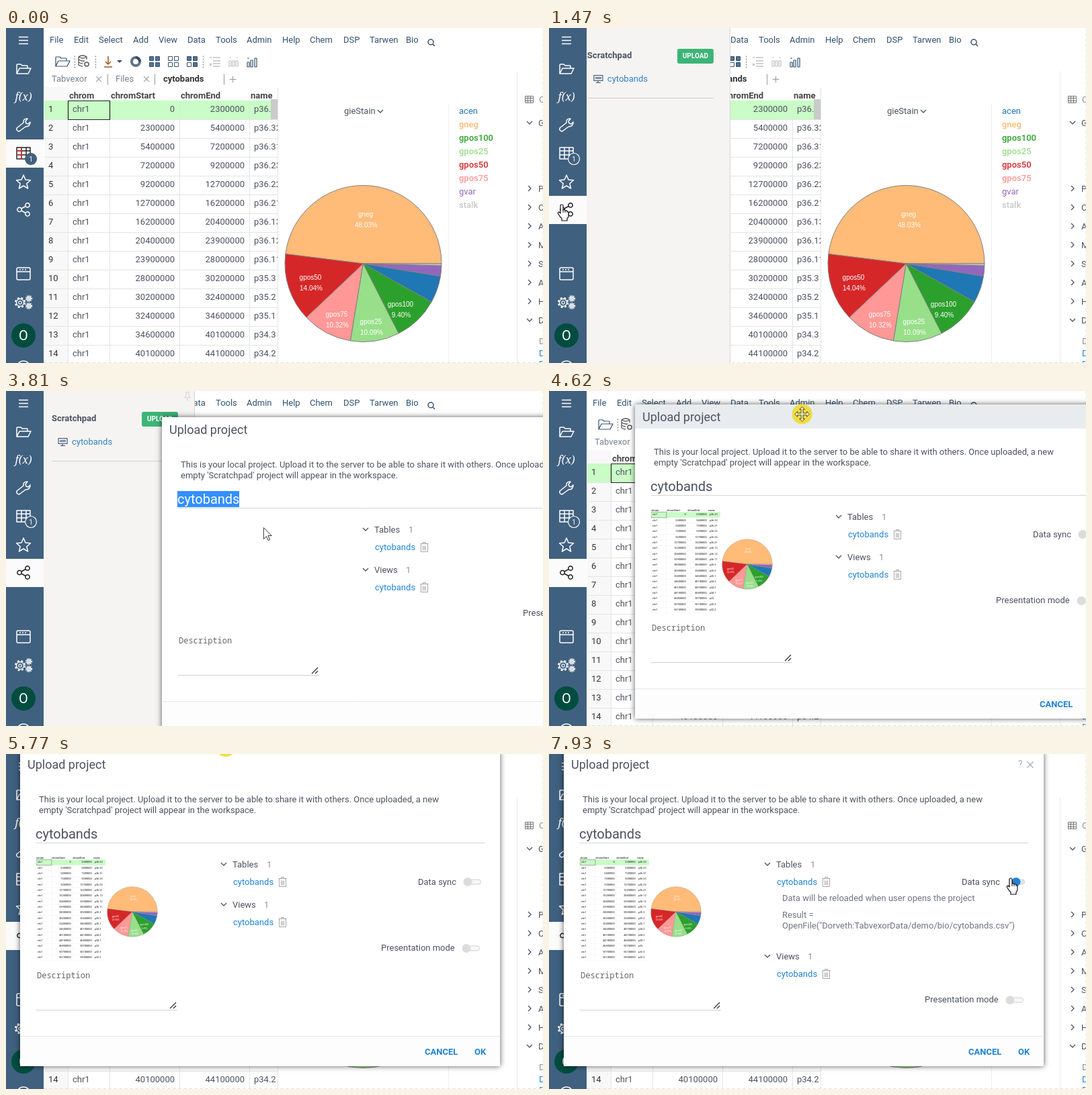
An HTML page with a canvas for the animation above (8000 ms loop, 799 px wide and 499 px high).

```html
<!DOCTYPE html>
<html lang="en">
<head>
<meta charset="utf-8">
<title>Upload project</title>
<style>
html, body { margin: 0; width: 100%; height: 100%; overflow: hidden; background: #fff; }
canvas { display: block; }
</style>
</head>
<body>
<canvas id="stage" width="799" height="499"></canvas>
<script>
const g = document.getElementById('stage').getContext('2d');
const LOOP = 8000;
const INK = '#4d5261', NAVY = '#34506c', SIDE = '#40607f', LINK = '#2083d5', PALE = '#e2e4e6', MUTED = '#8a919c';
const SANS = 'Roboto, sans-serif';

const clamp = v => Math.max(0, Math.min(1, v));
const progress = (t, from, to) => clamp((t - from) / (to - from));
const easeOut = p => 1 - (1 - p) ** 2;

// y is the middle of the capitals; baselines sit on whole pixels
function text(str, x, y, color = INK, { size = 13, weight = 400, align = 'left', family = SANS } = {}) {
  g.font = `${weight} ${size}px ${family}`;
  g.textAlign = align;
  g.fillStyle = color;
  g.fillText(str, x, Math.round(y + size * 0.32));
}
function box(x, y, w, h, color) {
  g.fillStyle = color;
  g.fillRect(x, y, w, h);
}
function line(x1, y1, x2, y2, color = PALE, dash = []) {
  path(`M${x1 + .5} ${y1 + .5}L${x2 + .5} ${y2 + .5}`, 0, 0, color, { width: 1, dash });
}
function path(d, x, y, color, { fill, width = 1.5, dash = [] } = {}) {
  const shape = new Path2D(d);
  g.save();
  g.translate(x, y);
  g.lineJoin = 'round';
  if (fill) { g.fillStyle = fill; g.fill(shape); }
  if (color) {
    g.strokeStyle = color;
    g.lineWidth = width;
    g.setLineDash(dash);
    g.stroke(shape);
  }
  g.restore();
}
function circle(x, y, r, fill, color, options = {}) {
  path(`M${r} 0A${r} ${r} 0 1 1 ${-r} 0A${r} ${r} 0 1 1 ${r} 0`, x, y, color, { fill, ...options });
}
function clipped(x, y, w, h, draw) {
  g.save();
  g.beginPath();
  g.rect(x, y, w, h);
  g.clip();
  draw();
  g.restore();
}
function chevron(x, y, down, color = INK) {
  path(down ? 'M-4-2L0 2 4-2' : 'M-2-4L2 0-2 4', x, y, color, { width: 1.3 });
}
const cross = (x, y, r, color) => path(`M${-r} ${-r}L${r} ${r}M${r} ${-r}L${-r} ${r}`, x, y, color, { width: 1.2 });

const FOLDER = 'M-10 7V-6q0-1 1-1h5l2 2h7q1 0 1 1v3M-10 7l4-8H11l-4 8z';
const TABLE = 'M-10-9H10V8H-10zM-10-4H10M-10 2H10M-3-9V8M4-9V8';
const TRASH = 'M-6-5H6M-2-5v-2h4v2M-5-5V7H5V-5M-2-2V5M0-2V5M2-2V5';
const WRENCH = 'M-7 9q-4-1-3-5L0-4q-1-6 6-6L3-6 4-3 7-2 10-5q0 7-7 7L-5 8z';
const STAR = 'M0-10l3 7 7.5.7-5.7 5L6.6 10 0 6l-6.6 4 1.8-7.3-5.7-5L-3-3z';
const HAND = 'M4 13V2q0-2 2-2t2 2v6q3-1 3 1 3-1 3 1 2 0 2 2v5q0 2-2 4v3H6v-3Q3 18 .5 13.500 0 11 2 11z';
const ARROW = 'M0 0V17l4-4 3 6 2.500-1-3-6h5.500z';
const MOVE = 'M0-11L4-7H1.500V-1.500H7V-4L11 0 7 4V1.500H1.500V7H4L0 11-4 7h2.500V1.500H-7V4L-11 0-7-4v2.500h5.500V-7H-4z';

const ends = [2.3, 5.4, 7.2, 9.2, 12.7, 16.2, 20.4, 23.9, 28, 30.2, 32.4, 34.6, 40.1, 44.1, 46.8, 50.7, 56.1, 59];
const bands = 'p36.33 p36.32 p36.31 p36.23 p36.22 p36.21 p36.13 p36.12 p36.11 p35.3 p35.2 p35.1 p34.3 p34.2 p34.1 p33 p32.3 p32.2'.split(' ');
const slices = [
  ['gneg', 48.03, '#ffbb78', 535, 277], ['gpos50', 14.04, '#d62728', 453, 371],
  ['gpos75', 10.32, '#ff9896', 492, 426], ['gpos25', 10.09, '#98df8a', 543, 437],
  ['gpos100', 9.40, '#2ca02c', 587, 411], ['acen', 5.54, '#1f77b4'],
  ['gvar', 2.17, '#9467bd'], ['stalk', .41, '#c7c7c7']
];

function grid({ chromX, right, rows, numbered, ink }) {
  const cols = [chromX, 155, 259, 363], bottom = 108 + rows * 28;
  const left = numbered ? 57 : chromX;
  const toRight = { align: 'right' };
  clipped(left - 1, 88, right - left + 1, bottom - 88, () => {
    if (numbered) box(57, 88, 36, 411, '#f8f8f8');
    box(left, 108, right, 28, '#c9fcc6');
    ['chrom', 'chromStart', 'chromEnd', 'name'].forEach((h, i) => text(h, cols[i] + 1, 101, '#444', { weight: 700 }));
    for (let i = 0; i < rows; i++) {
      const y = 121 + 28 * i;
      if (numbered) text(i + 1, 63, y, '#333');
      text('chr1', chromX + 6, y, ink);
      text(i ? Math.round(ends[i - 1] * 1e6) : 0, 251, y, ink, toRight);
      text(Math.round(ends[i] * 1e6), 355, y, ink, toRight);
      text(bands[i], 369, y, ink);
      line(left, 136 + 28 * i, right, 136 + 28 * i);
    }
    cols.forEach(x => line(x - 1, 108, x - 1, bottom));
    path(`M${chromX - .5} 108.500H154.500V136.500H${chromX - .5}z`, 0, 0, '#222', { width: 1.2 });
  });
}

function pie(cx, cy, scale) {
  g.save();
  g.translate(cx, cy);
  g.scale(scale, scale);
  let angle = 0;
  for (const [, share, color] of slices) {
    const next = angle - share / 100 * Math.PI * 2;
    g.beginPath();
    g.moveTo(0, 0);
    g.arc(0, 0, 116.5, angle, next, true);
    g.closePath();
    g.fillStyle = color;
    g.fill();
    g.strokeStyle = '#808080';
    g.lineWidth = 1;
    g.stroke();
    angle = next;
  }
  const style = { size: 10, align: 'center', family: '"Liberation Sans", Arial, sans-serif' };
  for (const [name, share, , x, y] of slices) {
    if (!x) continue;
    text(name, x - 531.5, y - 350.5, '#fff', style);
    text(share.toFixed(2) + '%', x - 530.5, y - 334.5, '#fff', style);
  }
  g.restore();
}

function toolbar() {
  const menu = { File: 65, Edit: 101, Select: 138, Add: 189, View: 227, Data: 270, Tools: 312, Admin: 358, Help: 411, Chem: 452, DSP: 502, Tarwen: 541, Bio: 595 };
  for (const name in menu) text(name, menu[name], 18, NAVY);
  circle(632, 21, 4, null, NAVY);
  path('M3 3l3 3', 632, 21, NAVY);

  path(FOLDER, 84, 50, NAVY, { width: 1.2 });
  path('M-6-6q6-4 12 0v4M-6-6q6 4 12 0M-6-6V6q3 2 6 2M-6-2q5 3 9 2M-6 2q3 2 6 2', 114, 49, '#555', { width: 1.3 });
  circle(120, 54, 3, null, '#555');
  [102, 133, 293].forEach(x => line(x, 41, x, 59, '#777', [2, 2]));
  path('M0-8V4M-4 0L0 4 4 0M-6 8H6', 152, 50, '#a4561e');
  path('M-4-2H4L0 2z', 169, 50, null, { fill: NAVY });
  circle(193, 50, 6, null, '#627186', { width: 4 });
  path('M0-6A6 6 0 0 1 6 0', 193, 50, NAVY, { width: 4 });
  [221, 249, 277].forEach((x, i) => {
    for (let k = 0; k < 4; k++) {
      const fill = i === 0 || i === 2 && k !== 2 ? '#557394' : '#fff';
      path('M0 0H6V6H0z', x - 7.5 + k % 2 * 9, 42.5 + (k >> 1) * 9, NAVY, { fill, width: 1 });
    }
  });
  path('M-3-6H8M-3-1H8M-3 3H8M-3 7H8M-8-6h3M-8 3l3 3M-5 3l-3 3', 311, 50, '#c2c2c2');
  path('M-6-1h3v8h-3zM-1-1h3v8h-3zM4-1h3v8h-3zM-6-6h3M4-6h3', 338, 50, '#c2c2c2', { width: 1.2 });
  path('M-7 1h3v7h-3zM-2-2h3v10h-3zM4-5h3V8h-3zM-7-5h3', 366, 50, NAVY, { width: 1.2 });

  text('Tabvexor', 68, 76, '#748291');
  text('Files', 163, 76, '#748291');
  text('cytobands', 234, 76, '#333', { weight: 700 });
  cross(138, 76, 4, '#a5abb2');
  cross(209, 76, 4, '#a5abb2');
  [151, 221, 324].forEach(x => line(x, 68, x, 84, '#999'));
  path('M-5 0H5M0-5V5', 337.5, 76.5, '#999', { width: 1 });
}

function workspace() {
  box(0, 0, 799, 499, '#fff');
  toolbar();
  grid({ chromX: 93, right: 404, rows: 14, numbered: true, ink: INK });
  box(394, 106, 10, 30, '#c9cbc9');
  line(404, 88, 404, 499);
  line(658, 112, 658, 499, '#eee');
  line(760, 64, 760, 499, '#eaeaea');
  text('gieStain', 503, 124);
  chevron(557, 124, true);
  pie(531.5, 351, 1);
  ['acen', 'gneg', 'gpos100', 'gpos25', 'gpos50', 'gpos75', 'gvar', 'stalk'].forEach((name, i) => {
    const color = slices.find(s => s[0] === name)[2];
    text(name, 674, 124 + 20 * i, color, { weight: /acen|gvar/.test(name) ? 400 : 500 });
  });

  path('M-6-5H6V5H-6zM-6-2H6M-6 2H6M-2-5V5M2-5V5', 778.5, 106.5, '#777', { width: 1 });
  text('C', 793, 107, MUTED);
  chevron(779, 141, true);
  text('G', 792, 142);
  [...'PCAMSAHD'].forEach((letter, i) => {
    chevron(779, 239 + 28 * i, letter === 'D');
    text(letter, 792, 240 + 28 * i);
  });
  text('D', 793, 467, MUTED);
  text('D', 793, 485, LINK);
  text('D', 793, 501, LINK);
  line(56, 498, 799, 498, '#ddd', [4, 4]);
  line(798, 0, 798, 499, '#eee', [4, 4]);
}

function gear(x, y, r) {
  circle(x, y, r, null, '#fff', { width: 1.3 });
  circle(x, y, r + 1.6, null, '#fff', { width: 2, dash: [r * .55, r * .5] });
  circle(x, y, r * .4, null, '#fff', { width: 1.2 });
}

function sidebar(shareActive) {
  box(0, 0, 56, 499, SIDE);
  box(0, shareActive ? 250 : 166, 56, 42, '#fbfbfb');
  const tableInk = shareActive ? '#fff' : '#222', shareInk = shareActive ? '#222' : '#fff';
  path('M-7-5H7M-7 0H7M-7 5H7', 26, 18.5, '#fff');
  path(FOLDER, 26, 61, '#fff');
  text('f(x)', 26, 103, '#fff', { size: 16, weight: 'italic 400', align: 'center', family: '"Noto Serif", serif' });
  path(WRENCH, 26, 145, '#fff');
  path(TABLE, 26, 187, tableInk);
  if (!shareActive) path('M-10-4H-3M-10 2H-3M-3-9V8', 26, 187, '#d33');
  circle(37, 195, 8.5, SIDE, shareActive ? '#fff' : SIDE, { width: 1.2 });
  text('1', 37, 195.5, '#fff', { size: 10, align: 'center' });
  path(STAR, 26, 229, '#fff');
  path('M-6 0L5-6M-6 0L5 6', 26, 270.5, shareInk);
  [[20, 270.5], [32, 264], [32, 277]].forEach(([x, y]) => circle(x, y, 3.2, shareActive ? '#fbfbfb' : SIDE, shareInk));
  path('M-8-9H8q2 0 2 2V7q0 2-2 2H-8q-2 0-2-2V-7q0-2 2-2zM-10-3H10M-6-6h2M-2-6h2M2-6h2', 26, 366, '#fff');
  gear(21, 409, 5.5);
  gear(34, 403, 2.5);
  gear(34, 414, 2.5);
  circle(26, 458, 18, '#004d40');
  text('O', 26, 458.5, '#fff', { size: 20, align: 'center' });
  circle(26, 506, 10, null, '#fff');
}

function scratchpad(open, pinned) {
  g.save();
  g.translate(-225 * (1 - open), 0);
  box(56, 0, 225, 499, '#f6f4f2');
  line(280, 0, 280, 499, '#d4d4d4');
  text('Scratchpad', 68, 41, INK, { weight: 700 });
  g.beginPath();
  g.roundRect(202, 31, 54, 22, 3);
  g.fillStyle = '#3cb577';
  g.fill();
  text('UPLOAD', 229, 42, '#fff', { size: 10, weight: 700, align: 'center' });
  path('M-6-5H7V3H-6zM-3 6H4M0 3V6M-4-2H5M-4 0H5', 84, 75.5, NAVY, { width: 1.1 });
  text('cytobands', 98, 76, '#3580bd');
  line(68, 104, 256, 104, '#d0d0d0');
  if (pinned) path('M-3-6H3M-2-6V-1L-4 2H4L2-1V-6M0 2V7', 270, 8, '#ddd');
  g.restore();
}

function toggle(x, y, on = 0) {
  path('M3-3.500H16a3.500 3.500 0 0 1 0 7H3', x, y, '#cfcfcf', { fill: on ? '#dce7f1' : '#f8f8f8', width: 1 });
  circle(x + 7 * on, y, 6.5, on ? LINK : '#dcdcdc');
}

function section(name, countX, y) {
  chevron(303, y - 1, true);
  text(name, 316, y);
  text('1', countX, y, MUTED);
  text('cytobands', 317, y + 26, LINK);
  path(TRASH, 390.5, y + 25.5, '#a6a6a6', { width: 1 });
}

function preview() {
  g.save();
  g.translate(.8, 128);
  g.scale(.298, .298);
  grid({ chromX: 78, right: 423, rows: 18, numbered: false, ink: '#111' });
  g.restore();
  pie(167, 238, .32);
}

function dialog(t, left, top) {
  const expand = easeOut(progress(t, 7700, 7930)), shift = 77 * expand;
  const hovered = t >= 4130 && t < 5300;
  g.save();
  g.globalAlpha = progress(t, 2740, 3100);
  g.translate(left, top);
  g.shadowColor = 'rgba(0,0,0,.65)';
  g.shadowBlur = 8;
  box(0, 0, 714, 468, '#fff');
  g.shadowColor = 'transparent';
  if (hovered) box(0, 0, 714, 36, '#e9ecef');
  box(0, 424, 714, 44, '#fdfdfd');
  line(0, 423, 714, 423, '#e8e8e8');

  text('Upload project', 11, 19, INK, { size: 18 });
  if (hovered || t >= 6430) {
    text('?', 676, 19, '#aab0b6', { size: 14 });
    cross(694, 19, 4.5, '#a5abb2');
  }
  text('This is your local project. Upload it to the server to be able to share it with others. Once uploaded, a new', 28, 71);
  text("empty 'Scratchpad' project will appear in the workspace.", 28, 87);
  const selected = t < 4160;
  if (selected) box(23, 110, 92, 24, '#3390ff');
  text('cytobands', 23, 123, selected ? '#fff' : INK, { size: 20 });
  line(23, 135, 691, 135, '#d4d4d4');

  if (t >= 3900) preview();
  section('Tables', 367, 168);
  if (expand) clipped(320, 204, 394, 64 * expand, () => {
    const note = '#6f7480';
    text('Data will be reloaded when user opens the project', 325, 218, note);
    text('Result =', 325, 243, note);
    text('OpenFile("Dorveth:TabvexorData/demo/bio/cytobands.csv")', 325, 259, note);
  });
  section('Views', 363, 228 + shift);
  text('Data sync', 592, 194);
  toggle(666, 193.5, progress(t, 7210, 7440));
  text('Presentation mode', 537, 292 + shift);
  toggle(664, 292.5 + shift);

  text('Description', 25, 333, '#666', { size: 12, family: '"Noto Sans Mono", monospace' });
  line(23, 384, 233, 384, '#cfcfcf');
  path('M-5 4L4-5M0 4L4 0', 228, 378, '#333', { width: 1.3 });
  text('CANCEL', 602, 447, LINK, { weight: 700 });
  text('OK', 676, 447, LINK, { weight: 700 });
  g.restore();
}

// time, x, y of the pointer's hot spot
const route = [
  [400, 392, 478], [1070, 19, 263], [1870, 19, 263], [2040, 95, 296], [2250, 165, 160], [2460, 229, 36],
  [3480, 229, 36], [3810, 383, 204], [4160, 481, 53], [4360, 481, 53], [4950, 245, 11], [5300, 245, 11],
  [5770, 327, -11], [5960, 332, -30], [6370, 332, -20], [6600, 470, 110], [6870, 640, 266], [7120, 687, 185], [LOOP, 687, 185]
];
function pointerAt(t) {
  const i = route.findIndex(key => key[0] > t);
  const [t0, x0, y0] = route[i - 1], [t1, x1, y1] = route[i];
  const p = progress(t, t0, t1);
  return [x0 + (x1 - x0) * p, y0 + (y1 - y0) * p];
}

function pointer(t, x, y) {
  if (t >= 4130 && t < 6000) {
    const pressed = t >= 4200 && !(t >= 5090 && t < 5150);
    if (pressed) circle(x, y, 15, '#efdc45');
    path(MOVE, x, y, '#4a4a3a', { fill: pressed ? '#f6ee9c' : '#fff', width: 1 });
  } else if (x < 56 || t > 2380 && t < 3550 || t > 7070) {
    path(HAND, x - 6, y, '#111', { fill: '#fff', width: 1.2 });
    path('M8 8v4M11 9v3M14 10v2', x - 6, y, '#111', { width: 1 });
  } else {
    path(ARROW, x, y, '#333', { fill: '#fff', width: 1 });
  }
}

function dialogPosition(t, x, y) {
  if (t < 4360) return [232, 39];
  if (t < 5300) return [x - 249, y - 14];
  return [-4 + 25 * easeOut(progress(t, 5300, 5770)) + progress(t, 5770, 5960), -3];
}

function draw(t) {
  workspace();
  if (t >= 1270 && t < 4160) scratchpad(easeOut(progress(t, 1230, 1540)), t >= 2000);
  sidebar(t >= 1270);
  const [x, y] = t >= 400 ? pointerAt(t) : [0, 0];
  if (t >= 2810) dialog(t, ...dialogPosition(t, x, y).map(Math.round));
  if (t >= 400) pointer(t, x, y);
}

function tick() {
  draw(performance.now() % LOOP);
  requestAnimationFrame(tick);
}
tick();
</script>
</body>
</html>
```
